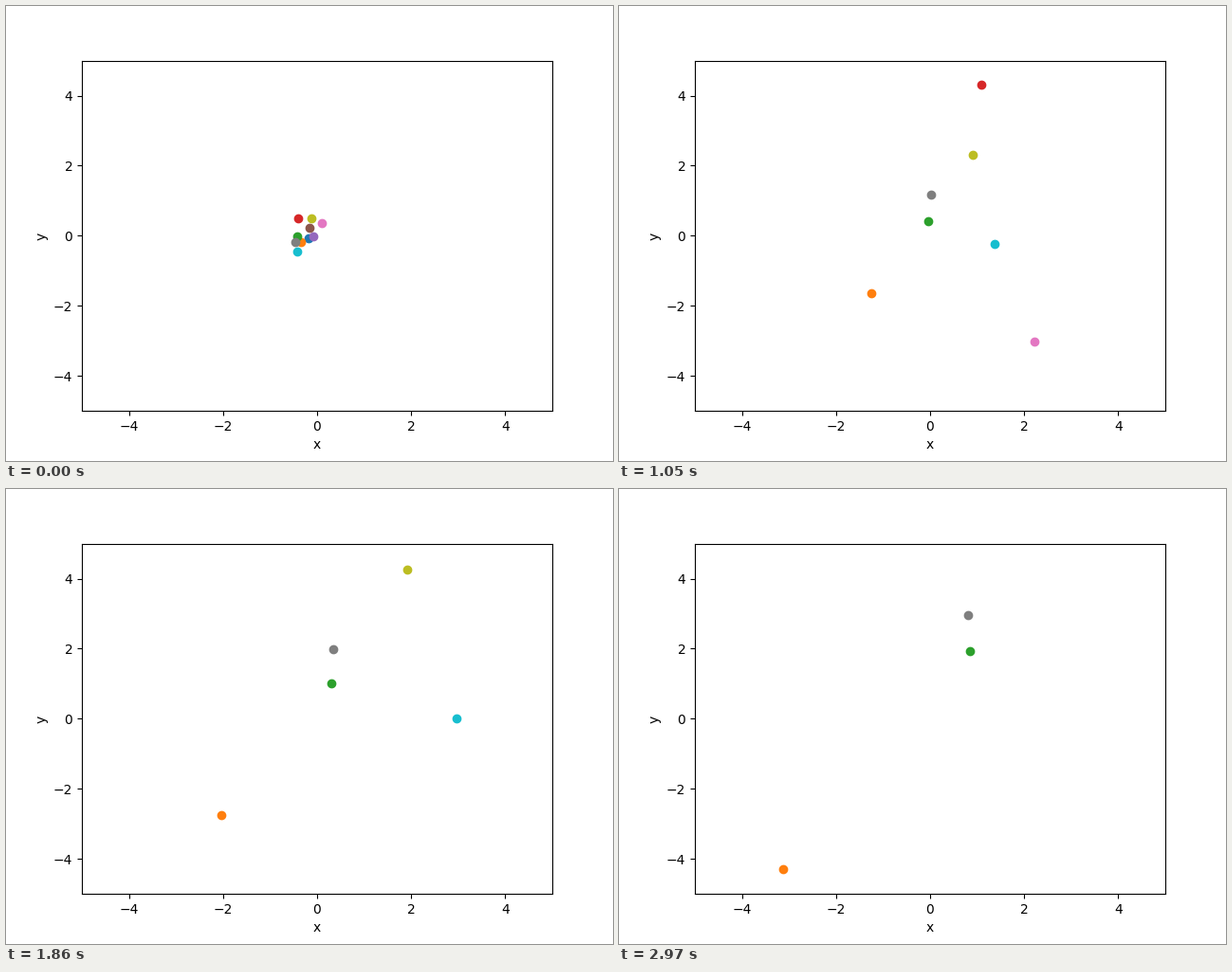
Write a matplotlib script that moves like this. It is 640 px wide and 480 px high and loops after 3 s.

```python
import numpy as np
import matplotlib.pyplot as plt
from matplotlib.animation import FuncAnimation

FRAMES, INTERVAL = 100, 30
REF = 14  # step by which every body flies freely

# Per body, in stage pixels: rest point, point at REF, velocity per step
BODIES = np.array([
    [(319, 245), (385, 351), (5.71, 9.42)],
    [(311, 249), (296.6, 271.3), (-1.457, 1.52)],
    [(307, 243), (313.8, 241), (0.565, -0.637)],
    [(308, 224), (329, 201), (2.53, -5.64)],
    [(324, 243), (245, 133), (-6.8, -9.5)],
    [(320, 234), (258, 253), (-10.53, 4.09)],
    [(333, 229), (344.3, 252.2), (4.48, 4.87)],
    [(305, 249), (318.4, 224), (0.495, -1.257)],
    [(322, 224), (334.2, 212.7), (1.854, -2.667)],
    [(307, 259), (333.9, 257.5), (2.995, -0.32)],
])
REST, POINT, VEL = BODIES.swapaxes(0, 1)

# The slow pair (green, gray) attract each other and lean towards cyan
PULL = np.zeros_like(REST)
PULL[[2, 7, 9]] = (0.0011, -0.0022), (0.0011, 0.0022), (-0.0011, 0)

# A body is flung out where its flight line passes closest to its rest point
approach = ((REST - POINT) * VEL).sum(1) / (VEL ** 2).sum(1)
LAUNCH = np.clip(REF + approach, 2.5, 8.5)[:, None]


def flight(step):
    t = step - REF
    return POINT + VEL * t + PULL * t * t


def positions(step):
    """Fall from rest to the launch point, then fly freely."""
    fall = REST + (flight(LAUNCH) - REST) * (step / LAUNCH) ** 2
    col, row = np.where(step < LAUNCH, fall, flight(step)).T
    return (col - 328) / 49.6, (242.4 - row) / 36.96


fig, ax = plt.subplots(figsize=(6.4, 4.8), dpi=100)
ax.set(xlim=(-5, 5), ylim=(-5, 5), xlabel="x", ylabel="y")
dots = [ax.plot([], [], "o")[0] for _ in BODIES]


def update(step):
    for dot, x, y in zip(dots, *positions(step)):
        dot.set_data([x], [y])
    return dots


anim = FuncAnimation(fig, update, frames=FRAMES, interval=INTERVAL,
                     repeat=True, repeat_delay=0)
plt.show()
```
